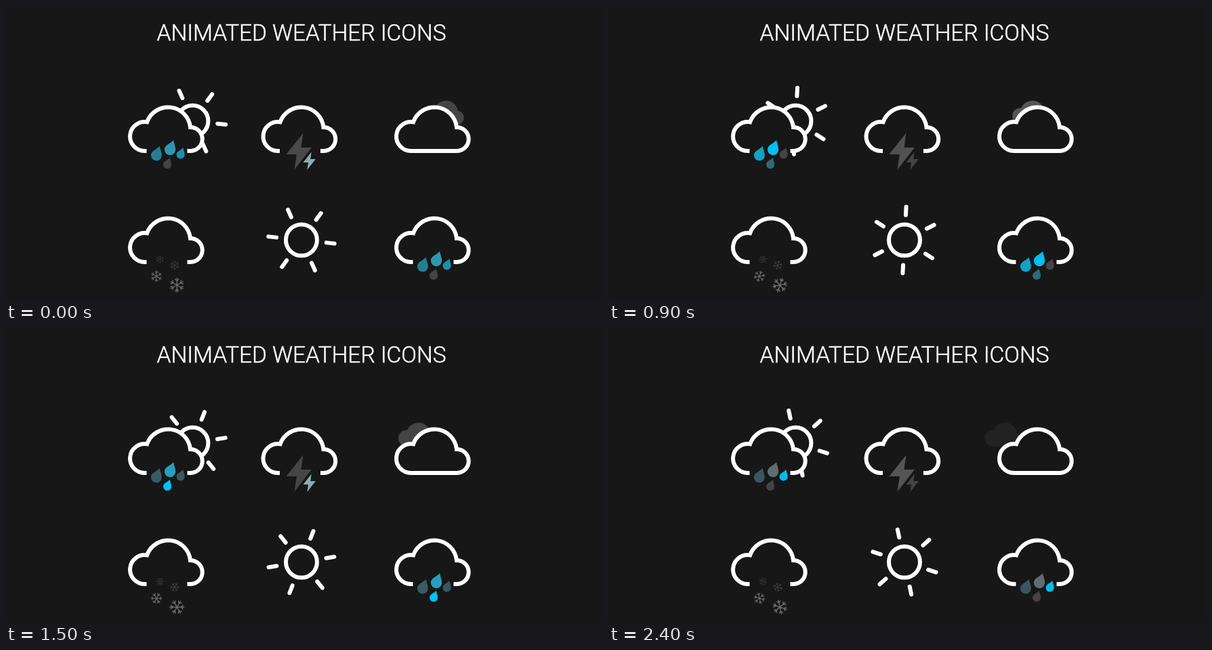
Animation, 881 px wide and 434 px high, one loop 2500 ms. Source, as an HTML page:

```html
<!DOCTYPE html>
<html lang="en">
<head>
<meta charset="utf-8">
<title>Animated Weather Icons</title>
<style>
  html, body { margin: 0; width: 100%; height: 100%; overflow: hidden; background: #171717; }
  svg { display: block; width: 881px; height: 434px; }
  text { font: 300 33.5px Roboto, "Liberation Sans", sans-serif; letter-spacing: -.05px; fill: #fff; stroke: #fff; stroke-width: .5; }
  .line { fill: #171717; stroke: #fff; stroke-width: 6; }
  .rays { stroke: #fff; stroke-width: 6; stroke-linecap: round; }
  .flake { fill: none; stroke-width: .12; }
</style>
</head>
<body>
<svg viewBox="0 0 881 434">
  <defs>
    <path id="open" d="M27.5 68H24.5A21.5 21.5 0 1 1 28.1 25.3A33 33 0 0 1 92 33A17.5 17.5 0 0 1 92.5 68H87.5"/>
    <path id="closed" d="M27.5 68H24.5A21.5 21.5 0 1 1 28.1 25.3A33 33 0 0 1 92 33A17.5 17.5 0 0 1 92.5 68Z"/>
    <path id="drop" d="M.62-1.7C.76-1 1.02-.5 1.02 .05A1.01 1.01 0 0 1-1 0C-1-.8 0-1 .62-1.7Z"/>
    <path id="bolt" d="M25 0L0 31.5H15.5L12 54L37.5 21.5H22Z"/>
    <g id="rays" class="rays"></g>
    <path id="flake"/>
  </defs>
  <rect width="881" height="434" fill="#171717"/>
  <text x="436" y="51" text-anchor="middle">ANIMATED WEATHER ICONS</text>
  <g id="stage"></g>
</svg>
<script>
const STEP = 150, LOOP = 2500;
const BLUE = [0, 194, 245], SPARK = [140, 172, 181], FLASH = [44, 186, 222];
const $ = id => document.getElementById(id);

function add(parent, tag, attrs) {
  const el = document.createElementNS('http://www.w3.org/2000/svg', tag);
  for (const k in attrs) el.setAttribute(k, attrs[k]);
  return parent.appendChild(el);
}
const stage = $('stage');
const use = (id, transform, attrs = {}) => add(stage, 'use', { href: '#' + id, transform, ...attrs });
const at = (x, y, s = 1) => `translate(${x} ${y}) scale(${s})`;

// Repeating triangle: 1 at the peak, 0 beyond half a width either side.
function pulse(t, peak, half, period) {
  const d = Math.abs(t - peak) % period;
  return Math.max(0, 1 - Math.min(d, period - d) / half);
}
const tint = (gray, color, k) => `rgb(${color.map(c => Math.round(gray + (c - gray) * k))})`;

for (let a = 0; a < 360; a += 60)
  add($('rays'), 'path', { d: 'M37 0H49', transform: `rotate(${a})` });

let arms = '';
for (let i = 0; i < 6; i++) {
  const s = Math.sin(i * Math.PI / 3), c = Math.cos(i * Math.PI / 3);
  const p = (r, w) => `${(r * s + w * c).toFixed(3)} ${(w * s - r * c).toFixed(3)}`;
  arms += `M0 0L${p(1, 0)}M${p(.85, -.28)}L${p(.55, 0)}L${p(.85, .28)}`;
}
$('flake').setAttribute('d', arms);

const suns = [];
function sun(x, y) {
  suns.push({ x, y, el: use('rays', at(x, y)) });
  add(stage, 'circle', { cx: x, cy: y, r: 23, class: 'line' });
}

const drops = [
  { x: 221.8, y: 220.2, r: 7.9, peak: .6, half: 1.1, gray: 68 },
  { x: 242, y: 211.8, r: 8.1, peak: .83, half: 1.7, gray: 102 },
  { x: 257.6, y: 219.3, r: 6, peak: 2.35, half: 1, gray: 68 },
  { x: 238, y: 233.9, r: 6, peak: 1.5, half: .85, gray: 68 }
];
function rain(dx, dy) {
  for (const d of drops)
    (d.els ||= []).push(use('drop', at(d.x + dx, d.y + dy, d.r)));
}

// Sun behind rain cloud
sun(275.4, 169.8);
add(stage, 'rect', { x: 207.5, y: 205, width: 61, height: 18, fill: '#171717' });
use('open', at(180, 146), { class: 'line' });
rain(0, 0);

// Thunder
use('open', at(376.5, 146), { class: 'line' });
const bigBolt = use('bolt', at(413.5, 187.5));
const smallBolt = use('bolt', at(438.5, 215.5, .49));

// Drifting cloud
const drift = use('closed', '', { fill: '#555', stroke: '#555', 'stroke-width': 6 });
use('closed', at(573, 146), { class: 'line' });

// Snow
use('open', at(180, 310), { class: 'line' });
const flake = (x, y, r, stroke) => ({ x, y, r, el: use('flake', '', { class: 'flake', stroke }) });
const flakes = [
  flake(227.3, 374, 5.8, '#3c3c3c'), flake(249, 382.6, 6.8, '#424242'),
  flake(222, 399, 8.4, '#707070'), flake(252.2, 412, 11, '#707070')
];

// Sun, rain
sun(436, 345.5);
use('open', at(573, 310), { class: 'line' });
rain(393, 164);

function draw(t) {
  for (const s of suns)
    s.el.setAttribute('transform', `${at(s.x, s.y)} rotate(${6 + 30 * t})`);
  for (const d of drops) {
    const k = pulse(t, d.peak, d.half, Math.max(2.75, 2 * d.half));
    d.els.forEach(el => el.setAttribute('fill', tint(d.gray, BLUE, k)));
  }
  const glow = 77 + 8 * Math.cos((t - .6) / .9 * Math.PI);
  bigBolt.setAttribute('fill', tint(glow, FLASH, pulse(t, 1.8, .15, 5)));
  smallBolt.setAttribute('fill', tint(68, SPARK, pulse(t, 0, .25, 1.5)));
  drift.setAttribute('transform', at(619.5 - 27 * t, 139.5, .5));
  drift.setAttribute('opacity', Math.min(1, .74 + .43 * t, 1.66 - .617 * t));
  for (const f of flakes)
    f.el.setAttribute('transform', `${at(f.x, f.y, f.r)} rotate(${20 * t})`);
}

const start = performance.now();
function tick() {
  const ms = (performance.now() - start) % LOOP;
  draw(Math.floor(ms / STEP) * STEP / 1000);
  requestAnimationFrame(tick);
}
tick();
</script>
</body>
</html>
```
